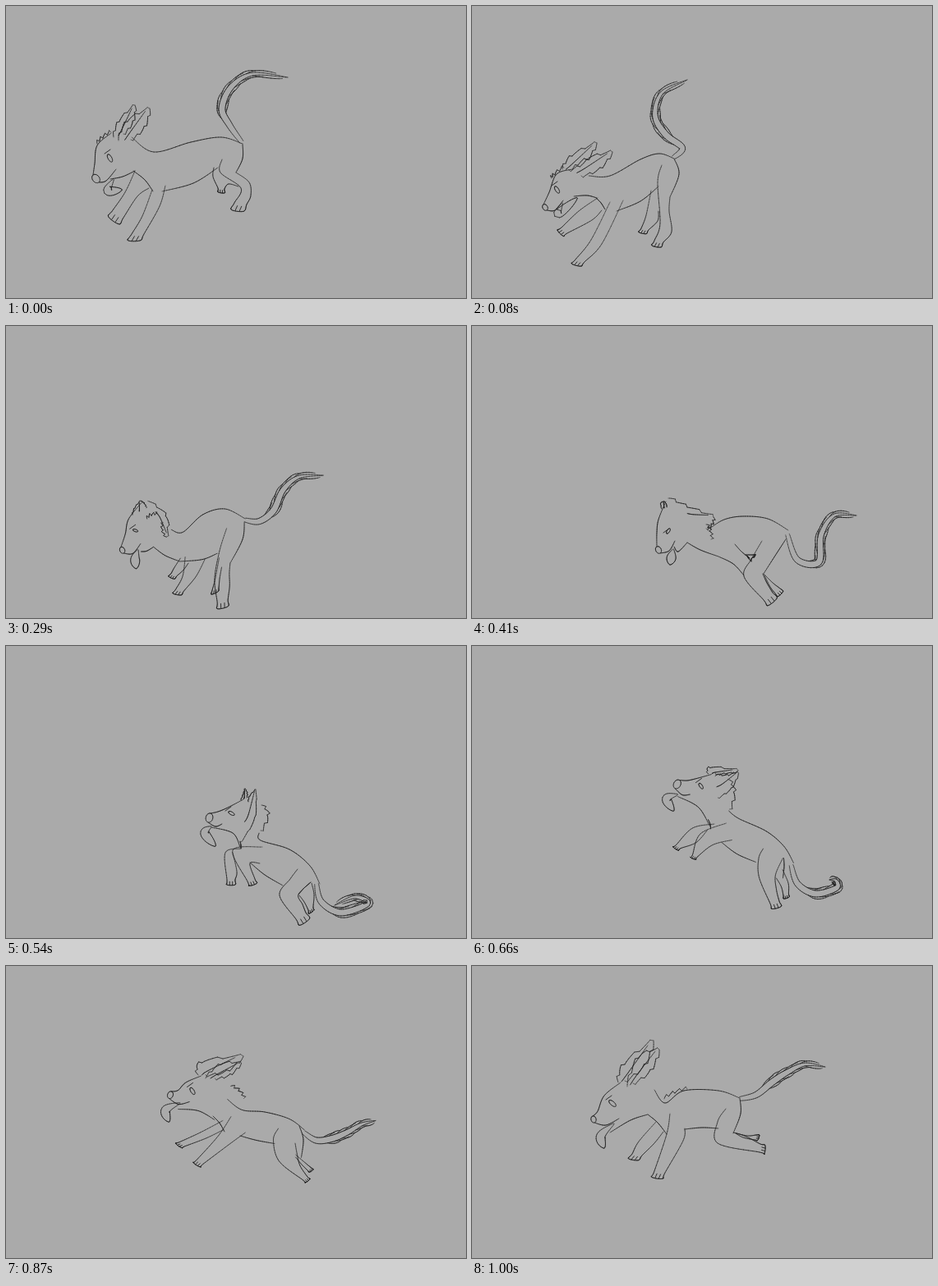
Animation of 560 by 356 pixels, one loop 1120 ms. Source, as an HTML page with a canvas:

```html
<!DOCTYPE html>
<html lang="en">
<head>
<meta charset="utf-8">
<title>Running dog sketch</title>
<style>
html, body { margin: 0; width: 100%; height: 100%; overflow: hidden; background: #aaa; }
canvas { display: block; width: 560px; height: 356px; }
</style>
</head>
<body>
<canvas id="stage" width="560" height="356"></canvas>
<script>
// Key points of each pose; fur, paws, nose, eye, ears, tongue and tail are grown from them.
// Legs run down the front edge and up the back edge. Ears are root, bend, tip, root.
const stretch = {
  face: "128,155 111,170 108,192 106,206", lip: "113,215 122,213 134,199",
  throat: "127,211 142,208 157,201", tongue: "131,211 124,225 141,224", eye: "124,181 129,190",
  earA: "131,160 138,141 157,121 143,156", earB: "137,164 148,141 175,125 152,163",
  mane: "111,168 118,161 128,154", back: "153,160 180,178 225,166 262,160 288,168",
  rump: "288,168 288,186 280,203", chest: "155,201 169,212 179,226", belly: "190,226 228,216 258,197",
  farFront: "157,201 145,227 130,249 143,258 160,232 174,222",
  nearFront: "178,224 166,256 153,278 168,278 187,244 194,219",
  farHind: "253,197 252,208 258,222 266,223 271,217 283,220",
  nearHind: "263,187 261,203 286,222 278,240 293,242 298,231 296,215 280,203",
  tail: "287,166 272,145 263,125 274,99 300,83 343,87"
};
const reach = {
  face: "122,199 103,205 94,227 87,242", lip: "91,249 101,249 111,237",
  throat: "124,232 140,231 152,234", tongue: "110,240 105,253 128,234", eye: "101,220 106,228",
  earA: "110,199 122,183 152,167 118,200", earB: "122,200 140,187 171,178 133,207",
  mane: "97,210 101,206 112,197", back: "142,207 168,207 205,187 228,180 246,186",
  rump: "246,186 252,205 241,233", chest: "151,234 157,240 162,248", belly: "176,250 205,238 227,220",
  farFront: "153,234 130,250 109,270 116,277 146,261 158,249",
  nearFront: "168,239 145,285 126,309 137,312 158,290 184,237",
  farHind: "218,225 212,255 206,271 215,273 226,262 227,250",
  nearHind: "231,194 226,215 229,265 222,286 233,288 243,275 240,250 241,233",
  tail: "245,185 256,173 236,157 223,134 231,106 262,90"
};
const land = {
  face: "130,216 111,235 106,254 98,270", lip: "101,277 112,279 123,267",
  throat: "124,278 132,274 139,272", tongue: "119,273 115,285 118,298", eye: "114,246 121,252",
  earA: "116,234 121,225 129,213 138,222", earB: "140,215 161,237 147,269 145,236",
  mane: "116,232 122,222 132,215", back: "158,249 170,259 195,229 220,217 245,228",
  rump: "245,228 247,252 233,282", chest: "139,272 152,283 168,290", belly: "168,290 200,282 221,264",
  farFront: "153,285 140,302 131,313 142,316 155,304 164,290",
  nearFront: "168,289 160,320 144,341 158,343 179,315 194,283",
  farHind: "212,272 201,305 193,320 202,318 208,305 217,290",
  nearHind: "227,239 220,270 216,310 209,338 223,338 229,318 230,298 233,282",
  tail: "245,228 265,215 278,194 294,173 315,161 346,158"
};
const gather = {
  face: "236,214 227,236 225,252 225,269", lip: "229,277 240,274 247,262",
  throat: "246,269 251,275 262,264", tongue: "245,272 243,281 241,291", eye: "237,253 241,247",
  earA: "231,223 230,216 234,214 237,221", earB: "239,210 262,221 294,233 285,247",
  mane: "285,242 289,250 291,260", back: "289,247 307,236 330,232 360,235 385,249",
  rump: "382,260 371,277 355,302", chest: "262,264 278,273 300,281", belly: "300,281 318,290 331,304",
  farFront: "333,279 337,279 343,279 342,282 340,284 340,287",
  nearFront: "320,266 327,274 334,280 336,282 338,285 340,287",
  farHind: "356,304 363,318 369,326 375,320 366,313 355,302",
  nearHind: "353,262 341,283 331,305 355,334 366,325 360,315 357,309 354,302",
  tail: "384,254 396,285 422,288 425,255 441,231 468,231"
};
const rear = {
  face: "289,187 270,197 258,202 249,204", lip: "246,215 255,220 263,217",
  throat: "250,221 276,228 285,245", tongue: "250,220 242,228 255,244", eye: "271,202 278,206",
  earA: "286,188 289,181 291,174 293,185", earB: "295,190 297,183 304,175 286,239",
  mane: "311,194 318,206 310,225", back: "308,228 310,237 345,248 370,268 382,290",
  rump: "371,288 363,295 356,303", chest: "285,238 286,243 286,247", belly: "297,264 315,279 337,292",
  farFront: "286,247 267,252 269,285 279,285 281,275 276,252",
  nearFront: "312,245 276,249 294,287 303,284 297,265 309,265",
  farHind: "357,304 363,312 368,322 374,318 375,303 372,289",
  nearHind: "355,272 346,284 333,304 353,333 365,325 361,315 356,303 371,288",
  tail: "378,290 384,312 408,325 440,314 425,306 400,316"
};
const leap = {
  face: "294,126 277,126 266,126 256,123", lip: "248,132 257,143 268,145",
  throat: "251,146 275,165 294,194", tongue: "251,142 232,144 236,158", eye: "282,133 284,142",
  earA: "290,124 291,116 357,129 300,125", earB: "297,127 320,129 345,135 313,131",
  mane: "313,131 319,150 317,173", back: "317,174 340,184 372,204 390,221 401,239",
  rump: "388,229 397,243 401,263", chest: "290,185 294,192 295,199", belly: "311,215 330,228 354,235",
  farFront: "304,187 270,192 228,200 230,208 265,204 297,197",
  nearFront: "307,187 280,209 243,222 246,230 289,220 324,208",
  farHind: "384,262 390,275 390,286 397,286 395,275 384,256",
  nearHind: "354,222 352,234 366,260 373,295 383,297 380,278 383,255 386,229",
  tail: "399,244 409,268 428,279 447,276 461,266 470,254"
};
const glide = {
  face: "181,142 161,158 153,177 147,183", lip: "149,191 163,194 179,186",
  throat: "168,203 193,188 214,181", tongue: "173,192 157,207 161,222", eye: "167,164 175,171",
  earA: "178,142 186,120 221,91 186,140", earB: "189,147 203,112 228,102 196,143",
  mane: "234,162 247,155 262,150", back: "222,151 235,167 258,152 300,152 326,161",
  rump: "326,161 327,180 318,204", chest: "214,181 226,191 237,205", belly: "259,199 280,197 300,198",
  farFront: "224,190 203,214 195,229 207,231 222,216 233,202",
  nearFront: "241,180 237,205 222,250 235,252 257,213 259,198",
  farHind: "321,204 330,209 344,212 346,206 336,207 321,204",
  nearHind: "309,174 299,190 299,216 350,227 351,217 336,209 326,205 318,203",
  tail: "326,162 346,157 365,142 383,130 405,120 430,123"
};

// start ms, pose, next pose, blend, x shift
const steps = [
  [0, stretch], [80, reach], [160, reach, land, 0.5, -13], [200, land],
  [290, land, gather, 0.33, 0], [350, land, gather, 0.67, 0], [410, gather], [540, rear],
  [660, rear, leap, 0.5, 0], [750, leap], [870, leap, glide, 0.5, 0], [1000, glide]
];
const LOOP = 1120;

const add = (p, q, k = 1) => ({ x: p.x + q.x * k, y: p.y + q.y * k });
const mix = (p, q, t = 0.5) => ({ x: p.x + (q.x - p.x) * t, y: p.y + (q.y - p.y) * t });
const gap = (p, q) => Math.hypot(q.x - p.x, q.y - p.y);
const heading = (p, q) => {
  const d = gap(p, q) || 1;
  return { x: (q.x - p.x) / d, y: (q.y - p.y) / d };
};
const leftOf = v => ({ x: v.y, y: -v.x });
const readPoints = text => text.split(" ").map(pair => {
  const [x, y] = pair.split(",").map(Number);
  return { x, y };
});

function poseAt([, pose, next = pose, blend = 0, shift = 0]) {
  const out = {};
  for (const key in pose) {
    const to = readPoints(next[key]);
    out[key] = readPoints(pose[key]).map((p, i) => add(mix(p, to[i], blend), { x: shift, y: 0 }));
  }
  return out;
}

// Catmull-Rom curve as a dense polyline
function smooth(pts) {
  const out = [pts[0]];
  for (let i = 0; i < pts.length - 1; i++) {
    const b = pts[i], c = pts[i + 1], a = pts[i - 1] || b, d = pts[i + 2] || c;
    const at = (k, t) => b[k] + 0.5 * t * (c[k] - a[k]
      + t * (2 * a[k] - 5 * b[k] + 4 * c[k] - d[k] + t * (3 * b[k] - a[k] - 3 * c[k] + d[k])));
    for (let s = 1; s <= 10; s++) out.push({ x: at("x", s / 10), y: at("y", s / 10) });
  }
  return out;
}

// Moves every point sideways by offset(t)
function sideways(line, offset) {
  const last = line.length - 1;
  return line.map((p, i) => {
    const side = leftOf(heading(line[Math.max(0, i - 1)], line[Math.min(last, i + 1)]));
    return add(p, side, offset(i / last));
  });
}
const fringe = (line, teeth, depth) => sideways(line, t => depth * (t * teeth % 1));

function oval(p, q, ratio) {
  const c = mix(p, q), r = gap(p, q) / 2, u = heading(p, q);
  return Array.from({ length: 17 }, (_, i) => {
    const a = i * Math.PI / 8;
    return add(add(c, u, r * Math.cos(a)), leftOf(u), r * ratio * Math.sin(a));
  });
}

function ear([root, bend, tip, end]) {
  const bow = add(mix(tip, end), leftOf(heading(tip, end)), gap(tip, end) * 0.12);
  const ragged = gap(root, tip) * 0.06;
  return [
    fringe(smooth([root, bend, tip]), 4, ragged),
    fringe(smooth([tip, bow, end]), 4, ragged),
    smooth([mix(root, end), mix(mix(root, end), mix(bend, bow)), mix(bend, tip, 0.8)])
  ];
}

function leg(pts) {
  const h = pts.length / 2, front = pts[h - 1], heel = pts[h];
  const way = heading(mix(pts[h - 2], pts[h + 1]), mix(front, heel));
  const size = gap(front, heel) * 0.6;
  const toe = add(front, way, size), pad = add(heel, way, size);
  const claws = [0.33, 0.67].map(t => {
    const p = add(mix(toe, pad, t), way, 0.5);
    return [p, add(p, way, -size * 0.7)];
  });
  return [smooth([...pts.slice(0, h), toe, pad, ...pts.slice(h)]), ...claws];
}

function tongue(pts) {
  const line = smooth(pts);
  const width = t => 5 * Math.sin(Math.PI * t ** 1.3) + 0.5;
  return [[...sideways(line, width), ...sideways(line, t => -width(t)).reverse()]];
}

function tail(pts) {
  const line = smooth(pts);
  const width = t => 4 * Math.sin(Math.PI * (0.2 + 0.8 * t));
  const edges = [sideways(line, width), sideways(line, t => -width(t))];
  const wisps = Array.from({ length: 12 }, (_, i) => {
    const sign = i % 2 ? 1 : -1, edge = edges[i % 2];
    const from = Math.floor(edge.length * (0.3 + i * 0.045));
    const strand = edge.slice(from, from + 9);
    return sideways(strand, t => -sign * (2 + i % 3) * (1 - t) * t * 2 + sign * -2 * t);
  });
  return [...edges, ...wisps];
}

function dogLines(p) {
  const [eye] = p.eye;
  return [
    ...["face", "lip", "throat", "back", "rump", "chest", "belly"].map(key => smooth(p[key])),
    oval(p.face[3], p.lip[0], 0.75),
    oval(...p.eye, 0.45),
    [add(eye, { x: -4, y: -1 }), add(eye, { x: 3, y: -6 })],
    fringe(smooth(p.mane), 4, 4),
    ...ear(p.earA), ...ear(p.earB), ...tongue(p.tongue), ...tail(p.tail),
    ...["farFront", "nearFront", "farHind", "nearHind"].flatMap(key => leg(p[key]))
  ];
}

const drawings = steps.map(step => dogLines(poseAt(step)));
const ctx = document.getElementById("stage").getContext("2d");
ctx.lineCap = "round";
ctx.strokeStyle = "#222";

// Pen pressure swells in the middle of a stroke
function draw(lines) {
  ctx.fillStyle = "#aaa";
  ctx.fillRect(0, 0, 560, 356);
  for (const line of lines) {
    for (let i = 1; i < line.length; i++) {
      ctx.lineWidth = 0.5 + 0.4 * Math.sin(Math.PI * i / line.length);
      ctx.beginPath();
      ctx.moveTo(line[i - 1].x, line[i - 1].y);
      ctx.lineTo(line[i].x, line[i].y);
      ctx.stroke();
    }
  }
}

const begin = performance.now();
let shown = -1;
function tick() {
  const t = (performance.now() - begin) % LOOP;
  const now = steps.findLastIndex(step => step[0] <= t);
  if (now !== shown) draw(drawings[shown = now]);
  requestAnimationFrame(tick);
}
tick();
</script>
</body>
</html>
```
